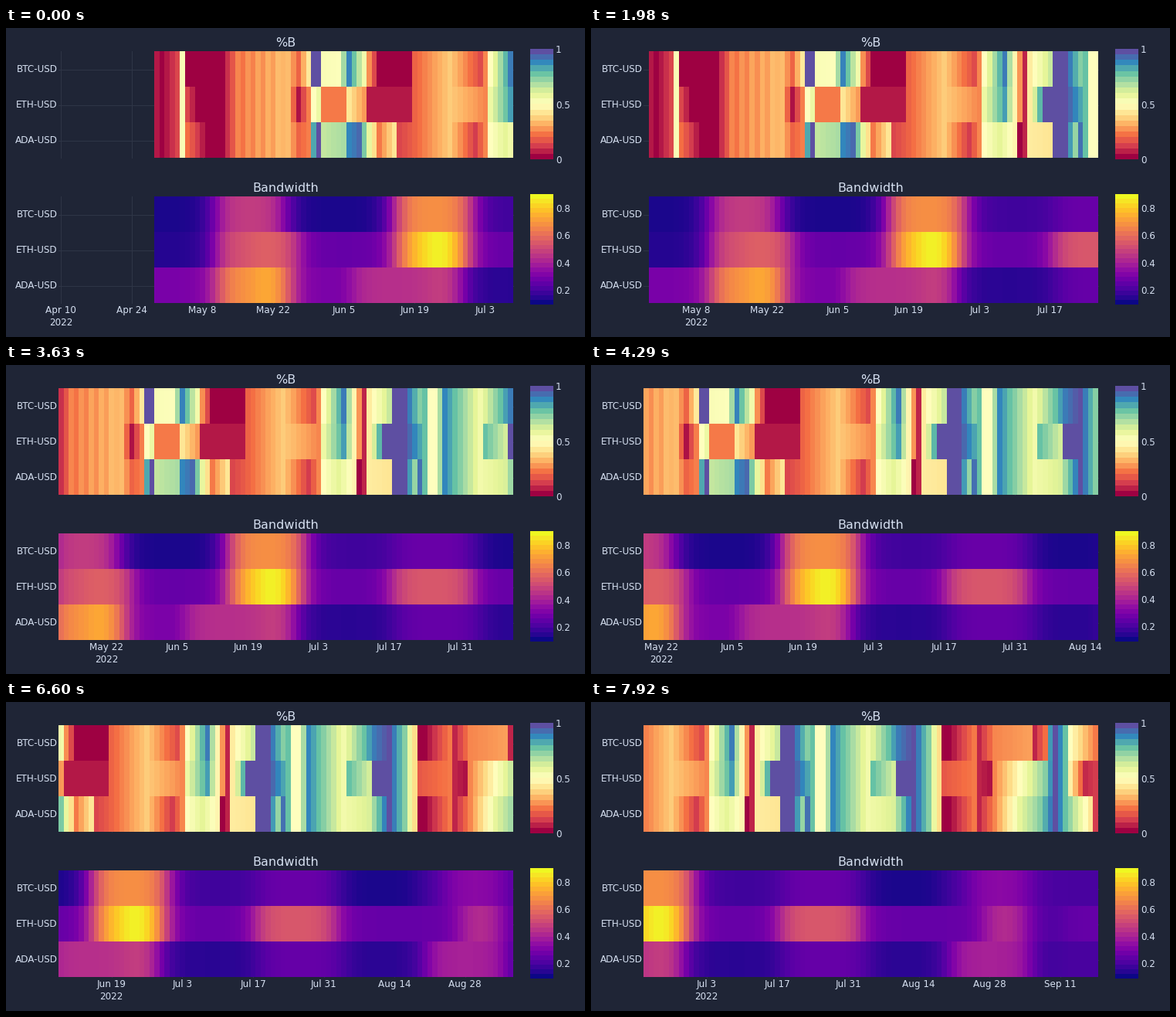
Recreate the animation shown at these times as a matplotlib script. Size 750 by 400 pixels, loop 8 s.

```python
import numpy as np
import matplotlib.pyplot as plt
from matplotlib.animation import FuncAnimation
from matplotlib.colors import LinearSegmentedColormap

W, H, DPI = 750, 400, 100
LOOP, TICK, HOLD = 8000, 20, 330      # ms: loop, frame, time per window
SPAN, SHIFT, LEAD, DAYS = 90, 3, 19, 143
LEFT, RIGHT = 68, 657
CELL = (RIGHT - LEFT) / SPAN
BG, GRID, INK = "#1f2536", "#2e3546", "#d5dff0"
PAIRS = ("BTC-USD", "ETH-USD", "ADA-USD")

spectral = LinearSegmentedColormap.from_list("spectral", [
    "#9e0142", "#d53e4f", "#f46d43", "#fdae61", "#fee08b", "#ffffbf",
    "#e6f598", "#abdda4", "#66c2a5", "#3288bd", "#5e4fa2"])

# Turning points (day: percent). All coins follow the market,
# each with a few turns of its own.
market = {0: 4, 1: 0, 4: 12, 5: 52, 13: 0, 14: 8, 16: 22, 26: 33, 28: 18,
          30: 23, 51: 18, 58: 36, 65: 24, 66: 50, 72: 47, 74: 6, 75: 44,
          80: 100, 82: 100, 86: 80, 87: 50, 88: 50, 90: 90, 97: 55,
          106: 100, 109: 75, 111: 40, 112: 0, 118: 22, 119: 6, 122: 24,
          134: 100, 136: 80, 142: 10}
btc = {6: 0, 30: 43, 31: 100, 32: 100, 33: 52, 36: 51, 38: 91, 41: 55,
       42: 25, 44: 0, 50: 0, 64: 13, 70: 92, 79: 65, 85: 75, 103: 92,
       113: 0, 129: 28, 130: 6, 132: 20, 133: 87, 137: 50, 142: 22}
eth = {6: 12, 8: 0, 28: 3, 31: 50, 32: 57, 33: 22, 37: 22, 38: 42, 41: 27,
       42: 4, 50: 4, 66: 57, 70: 86, 78: 100, 98: 80, 102: 63, 103: 100,
       112: 16, 121: 3, 132: 75, 137: 45, 140: 7}
ada = {6: 20, 10: 0, 31: 84, 32: 100, 33: 66, 37: 70, 38: 90, 40: 95,
       44: 22, 47: 42, 48: 12, 63: 10, 69: 60, 73: 0, 79: 42, 84: 73,
       85: 94, 102: 62, 113: 0, 127: 59, 131: 75, 141: 42}

day = np.arange(DAYS)
ripple = np.where(abs(day - 20) < 5, 0.022 * np.cos(np.pi * day), 0)


def position(own):
    x, y = zip(*sorted({**market, **own}.items()))
    return np.interp(day, x, y) / 100 + ripple


def swell(base, *plateaus):
    """Sum of soft-edged plateaus: (from, to, height)."""
    def step(at):
        return 0.5 + 0.5 * np.tanh((day - at) / 2.8)
    return base + sum(h * (step(a) - step(b)) for a, b, h in plateaus)


def grid(*rows):
    full = np.full((3, LEAD + DAYS), np.nan)
    full[:, LEAD:] = rows
    return np.ma.masked_invalid(full)


percent_b = grid(position(btc), position(eth), position(ada))
bandwidth = grid(
    swell(.02, (11.5, 25.5, .45), (47, 62.3, .72), (63, 97, .08),
          (80, 95, .1), (112, 150, .1), (117, 129, .17)),
    swell(.04, (11.5, 27.5, .5), (19, 25, .06), (26, 150, .15),
          (47.5, 61.5, .67), (53, 59, .17), (79.5, 95.5, .37),
          (120, 128, .24), (131, 135, -.08)),
    swell(.05, (-9, 37, .19), (12, 26.5, .5), (20, 25, .11),
          (38, 60.5, .37), (54, 60, .08), (80, 97, .14),
          (113, 129.5, .32), (133, 150, .07)))

fig = plt.figure(figsize=(W / DPI, H / DPI), dpi=DPI, facecolor=BG)
ax = fig.add_axes([0, 0, 1, 1])
ax.set_axis_off()


def text(x, y, s, px=12, ha="center"):
    return ax.text(x, y, s, fontsize=px * 72 / DPI, family="DejaVu Sans",
                   color=INK, ha=ha, va="baseline")


def heat(data, box, cmap, layer=2):
    return ax.imshow(data, cmap=cmap, vmin=0, vmax=1, aspect="auto",
                     interpolation="nearest", extent=box, zorder=layer)


def panel(title, top, data, cmap, bands):
    text(362.5, top - 6, title, 16)
    for i, name in enumerate(PAIRS):
        y = top + 23 + 46 * i
        ax.plot([LEFT, RIGHT], [y + .5, y + .5], color=GRID, lw=0.72, zorder=0)
        text(67, y + 4.3, name, ha="right")
    bar = top - 2.5
    heat(np.linspace(1, 0, bands)[:, None], (679, 709, bar + 143, bar), cmap)
    return heat(data[:, :SPAN], (LEFT, RIGHT, top + 138, top), cmap)


top_map = panel("%B", 30, percent_b, spectral, 20)
low_map = panel("Bandwidth", 218, bandwidth, "plasma", 24)
for i, value in enumerate(("1", "0.5", "0")):
    text(712, 32 + 71.5 * i, value, ha="left")
scale = [(v, text(712, 0, f"{v:.1f}", ha="left")) for v in (.2, .4, .6, .8)]

dates = ["Apr 10", "Apr 24", "May 8", "May 22", "Jun 5", "Jun 19", "Jul 3",
         "Jul 17", "Jul 31", "Aug 14", "Aug 28", "Sep 11"]
labels = [text(0, 369, s) for s in dates]
lines = [ax.plot([0] * 5, [30, 168, np.nan, 218, 356], color=GRID,
                 lw=0.72, zorder=0)[0] for _ in dates]
year = text(0, 385, "2022")
ax.set_xlim(0, W)
ax.set_ylim(H, 0)


def draw(i):
    start = SHIFT * ((i * TICK + TICK - 1) // HOLD)
    window = slice(start, start + SPAN)
    top_map.set_data(percent_b[:, window])
    low_map.set_data(bandwidth[:, window])

    # the scale reaches lower once the calmest days come into view
    low = 0.098 if start < 39 else 0.091
    for value, label in scale:
        label.set_y(362 - 143 * (value - low) / (0.907 - low))

    first = True
    for k, (label, line) in enumerate(zip(labels, lines)):
        col = 14 * k - start
        shown = 0 <= col < SPAN
        label.set_visible(shown)
        line.set_visible(shown)
        if not shown:
            continue
        x = LEFT + (col + 0.5) * CELL
        label.set_x(x)
        line.set_xdata([x] * 5)
        if first:
            year.set_x(x)
            first = False
    return []


anim = FuncAnimation(fig, draw, frames=LOOP // TICK, interval=TICK,
                     repeat=True, repeat_delay=0, blit=False)
plt.show()
```
